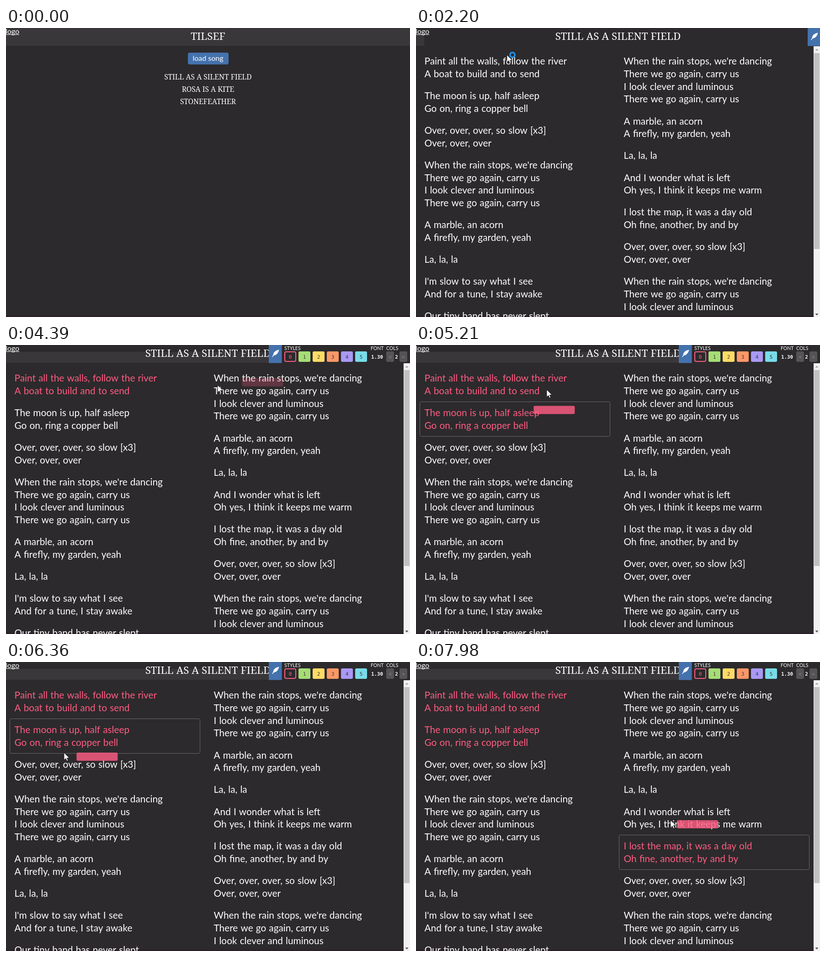
An HTML page with a canvas for the animation above (8000 ms loop, 884 by 634 pixels).

```html
<!DOCTYPE html>
<html lang="en">
<head>
<meta charset="utf-8">
<title>Song sheet</title>
<style>
html, body { margin: 0; width: 100%; height: 100%; overflow: hidden; background: #2c2a2c; }
canvas { display: block; }
</style>
</head>
<body>
<canvas id="stage" width="884" height="634"></canvas>
<script>
const c = document.getElementById('stage').getContext('2d');
const W = 884, H = 634, LOOP = 8000;
const BG = '#2c2a2c', BAR = '#3a373a', BLUE = '#4472ad', PINK = '#ff5c83', WHITE = '#fff';
const SANS = 'Lato, sans-serif', SERIF = '"Noto Serif", serif', MONO = '"DejaVu Sans Mono", monospace';
const SWATCHES = [PINK, '#a6dd75', '#ffdb66', '#fc9867', '#a999f5', '#78dce8'];

const SONG = 'STILL AS A SILENT FIELD';
const LIST = [SONG, 'ROSA IS A KITE', 'STONEFEATHER'];

const chorus = ["When the rain stops, we're dancing", 'There we go again, carry us',
  'I look clever and luminous', 'There we go again, carry us'];
const bridge = ['A marble, an acorn', 'A firefly, my garden, yeah'];
const over = ['Over, over, over, so slow [x3]', 'Over, over, over'];
const first = ['Paint all the walls, follow the river', 'A boat to build and to send'];
const second = ['The moon is up, half asleep', 'Go on, ring a copper bell'];
const found = ['I lost the map, it was a day old', 'Oh fine, another, by and by'];
const COLUMNS = [
  [first, second, over, chorus, bridge, ['La, la, la'],
    ["I'm slow to say what I see", 'And for a tune, I stay awake'], ['Our tiny band has never slept']],
  [chorus, bridge, ['La, la, la'],
    ['And I wonder what is left', 'Oh yes, I think it keeps me warm'], found, over, chorus.slice(0, 3)]
];

// Each picked verse is framed for a while and painted from some time on
const PICKS = new Map([
  [first, { from: 2450, to: 4250, paint: 4250 }],
  [second, { from: 5150, to: 7550, paint: 5150 }],
  [found, { from: 7550, to: LOOP, paint: 7550 }]
]);

// Pointer moves: start, end, goal x, goal y, vertical bend
const ENTER = [884, 334];
const MOVES = [
  [620, 1400, 386, 110],
  [2030, 2200, 199, 59],
  [2480, 2830, 858, 20],
  [2850, 3060, 768, 24],
  [3060, 3240, 858, 24],
  [3450, 4050, 615, 26, 50],
  [4250, 4905, 220, 155, 13],
  [5150, 5750, 560, 185, -110],
  [5820, 6525, 102, 200],
  [6525, 6850, 712, 460],
  [6850, 7080, 596, 417, -25],
  [7740, 7930, 557, 347]
];

// Eased progress from 0 to 1, slowing towards the end
function glide(t, from, to) {
  const u = Math.max(0, Math.min(1, (t - from) / (to - from)));
  return u * (2 - u);
}

function pointer(t) {
  let [x, y] = ENTER;
  for (const [from, to, goalX, goalY, bend = 0] of MOVES) {
    if (t < from) break;
    const f = glide(t, from, to);
    x += (goalX - x) * f;
    y += (goalY - y) * f + bend * Math.sin(Math.PI * f);
  }
  return [x, y];
}

function text(s, x, y, font, color = WHITE, align = 'left') {
  c.font = font;
  c.fillStyle = color;
  c.textAlign = align;
  c.fillText(s, x, y);
}

function rect(x, y, w, h, color) {
  c.fillStyle = color;
  c.fillRect(x, y, w, h);
}

function round(x, y, w, h, r, fill, line, width = 1) {
  c.beginPath();
  c.roundRect(x, y, w, h, r);
  if (fill) { c.fillStyle = fill; c.fill(); }
  if (line) { c.strokeStyle = line; c.lineWidth = width; c.stroke(); }
}

function triangle(x, y, h, color) {
  c.beginPath();
  c.moveTo(x - 3.5, y);
  c.lineTo(x + 3.5, y);
  c.lineTo(x, y + h);
  c.fillStyle = color;
  c.fill();
}

function page() {
  rect(0, 0, W, H, BG);
  rect(0, 631, W, 3, '#2b2029');
}

function logoLink() {
  text('logo', -1, 13, '16px ' + SANS);
  rect(0, 14, 29, 1, WHITE);
}

function home() {
  page();
  rect(0, 0, W, 39, BAR);
  logoLink();
  text('TILSEF', 442, 26, '22.5px ' + SERIF, WHITE, 'center');
  round(398, 54, 89, 26, 4, BLUE);
  text('load song', 442, 72, '16px ' + SANS, WHITE, 'center');
  LIST.forEach((s, i) => text(s, 442, 113 + 27 * i, '15.7px ' + SERIF, WHITE, 'center'));
}

function verses(t) {
  c.wordSpacing = '0.8px';
  COLUMNS.forEach((column, k) => {
    const x = 18.5 + 436 * k;
    let y = 80;
    for (const verse of column) {
      const pick = PICKS.get(verse);
      if (pick && t >= pick.from && t < pick.to)
        round(x - 10, Math.round(y - 31) - .5, 416, 76, 3, null, '#6b696b');
      const color = pick && t >= pick.paint ? PINK : WHITE;
      verse.forEach((s, i) => text(s, x, y + 27.8 * i, '20.8px ' + SANS, color));
      y += 27.8 * verse.length + 20.3;
    }
  });
  c.wordSpacing = '0px';
}

function scrollbar() {
  rect(870, 40, 14, 594, '#f1f1f1');
  rect(871, 55, 12, 430, '#c1c1c1');
  triangle(877, 49.5, -4, '#a3a3a3');
  triangle(877, 626.5, 4, '#505050');
}

function feather() {
  c.fillStyle = c.strokeStyle = WHITE;
  c.beginPath();
  c.moveTo(22.5, 10.5);
  c.bezierCurveTo(15, 11.5, 9.5, 16, 9.5, 23);
  c.bezierCurveTo(15.5, 23.5, 21, 18, 22.5, 10.5);
  c.fill();
  c.lineWidth = 1.4;
  c.beginPath();
  c.moveTo(7.5, 26);
  c.lineTo(12, 21);
  c.stroke();
}

function panel(t) {
  c.save();
  c.translate(857 - 282 * glide(t, 3410, 3540), 0);
  rect(0, 0, 309, 39, BG);
  rect(0, 0, 28.5, 39.5, BLUE);
  feather();
  const label = '10.5px ' + SANS, bold = 'bold 10.8px ' + MONO, mono = '11px ' + MONO;
  text('STYLES', 34, 11, label);
  SWATCHES.forEach((color, i) => {
    const x = 34 + 31 * i, active = i === 0 && t >= 3980;
    if (active) round(x + 1, 15, 24, 21, 3, BG, color, 2);
    else round(x, 14, 26, 23, 3, color);
    text(i, x + 13, 30, mono, active ? color : BAR, 'center');
  });
  text('FONT', 223, 11, label);
  text('1.30', 237, 30, bold, WHITE, 'center');
  text('COLS', 257, 11, label);
  ['<', '>'].forEach((s, i) => {
    const x = 257 + 29 * i;
    round(x, 14, 17, 23, 3, '#555355');
    text(s, x + 8.5, 30, mono, '#8d8b8d', 'center');
  });
  text('2', 279.5, 30, bold, WHITE, 'center');
  c.restore();
}

function sheet(t) {
  page();
  rect(0, 15, t < 4250 ? 18 : 575, 24, BAR);
  logoLink();
  text(SONG, 442, 26, '22.5px ' + SERIF, WHITE, 'center');
  verses(t);
  scrollbar();
  panel(t);
}

// The colour tag trails a little behind the pointer
function tag(t) {
  const [x, y] = pointer(t - 40);
  c.globalAlpha = .82 * Math.min(1, (t - 4320) / 230);
  round(x + 14, y, 90, 18, 3, PINK);
  c.globalAlpha = 1;
}

function arrow(t) {
  const [x, y] = pointer(t);
  c.save();
  c.translate(Math.round(x), Math.round(y));
  if (t >= 1430 && t < 3600) {
    c.beginPath();
    c.arc(12, 0, 5.2, 0, 7);
    c.strokeStyle = '#2492ec';
    c.lineWidth = 3.4;
    c.stroke();
  }
  const shape = new Path2D('M0 0V16L3.7 12.6 6.2 18.2 8.7 17.1 6.3 11.7 11.4 11.5Z');
  c.fillStyle = WHITE;
  c.fill(shape);
  c.strokeStyle = '#111';
  c.lineWidth = .8;
  c.stroke(shape);
  c.restore();
}

function draw(t) {
  const fade = Math.max(0, Math.min(1, (t - 1745) / 105));
  if (fade < 1) home();
  c.globalAlpha = fade;
  if (fade > 0) sheet(t);
  c.globalAlpha = 1;
  if (t >= 4320) tag(t);
  if (t >= 620) arrow(t);
}

const start = performance.now();
function tick() {
  draw((performance.now() - start) % LOOP);
  requestAnimationFrame(tick);
}
tick();
</script>
</body>
</html>
```
